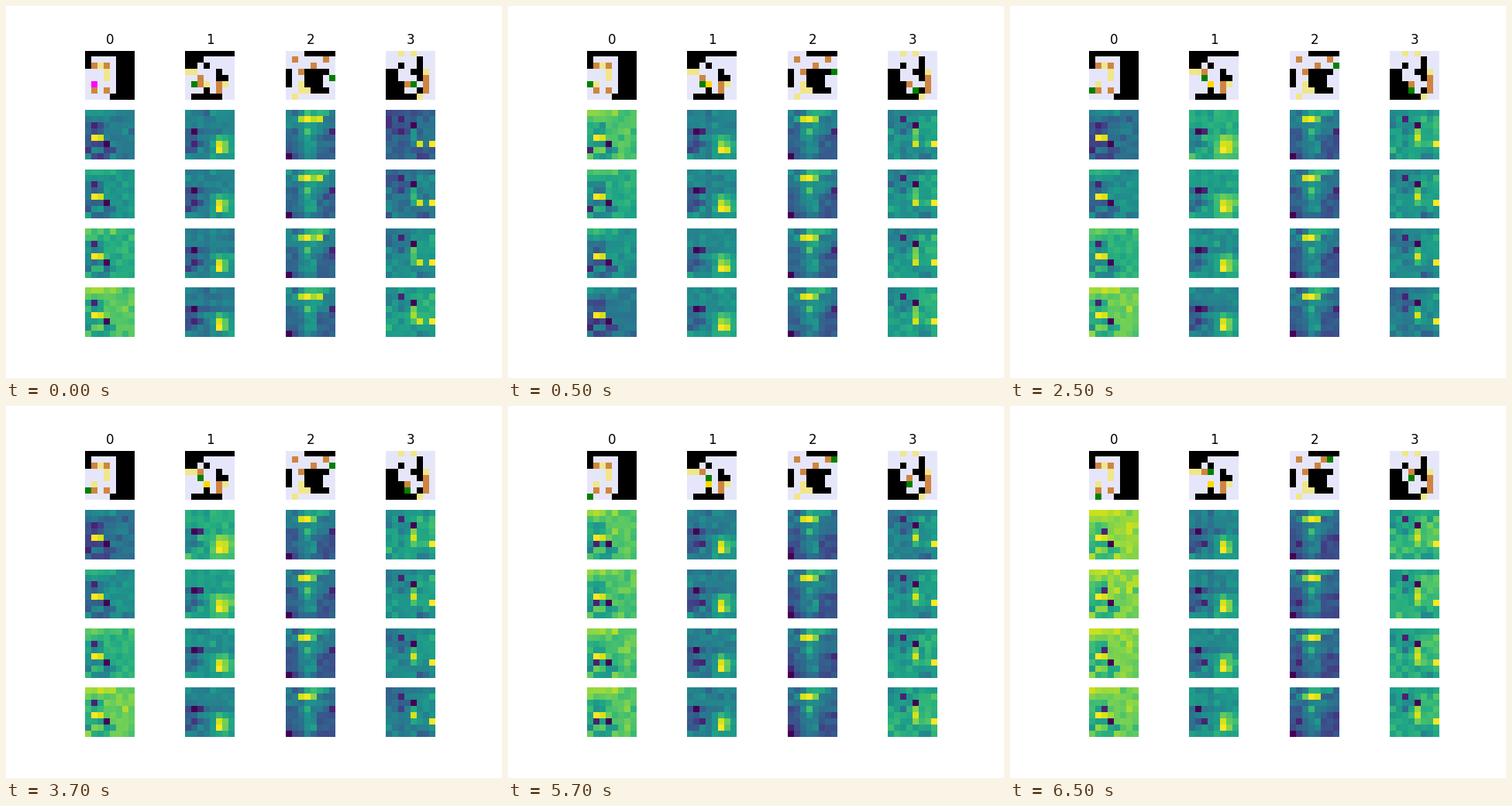
Animation, 640 px wide and 480 px high, one loop 8000 ms. Source, as a matplotlib script:

```python
import numpy as np
import matplotlib.pyplot as plt
from matplotlib.animation import FuncAnimation
from matplotlib.colors import to_rgb

N, STEPS, HEADS = 8, 5, 4
MOVES = {"U": -10, "D": 10, "L": -1, "R": 1}


def block(first, last):
    """Slices spanning two cells, each given as a row-column digit pair."""
    (r0, c0), (r1, c1) = divmod(first, 10), divmod(last, 10)
    return slice(r0, r1 + 1), slice(c0, c1 + 1)


def level_images(walls, goals, boxes, player, moves):
    """Play the box-pushing moves and paint the room after each one."""
    room = np.full((N, N, 3), to_rgb("lavender"))
    for span in walls:
        room[block(*span)] = to_rgb("black")
    images = []
    for move in " " + moves:
        shift = MOVES.get(move, 0)
        player += shift
        boxes = [b + shift if b == player else b for b in boxes]
        img = room.copy()
        for g in goals:
            img[divmod(g, 10)] = to_rgb("khaki")
        for b in boxes:
            img[divmod(b, 10)] = to_rgb("gold" if b in goals else "peru")
        img[divmod(player, 10)] = to_rgb("magenta" if player in goals else "green")
        images.append(img)
    return images


def heat_images(seed, ramps, low, dips, high, peaks, patches):
    """A shared relief, lifted from the top panel to the bottom one by a ramp."""
    rng = np.random.default_rng(seed)
    relief = rng.normal(0, 0.03, (N, N))
    for first, last, delta in patches:
        relief[block(first, last)] += delta
    images = []
    for (top, bottom), dip, peak in zip(ramps, dips, peaks):
        for level in np.linspace(top, bottom, HEADS):
            img = level + relief + rng.normal(0, 0.03, (N, N))
            img = np.clip(img, 0.1, 0.92)
            for code, value in ((dip, 0.1), (peak, 0.94), (low, 0), (high, 1)):
                img[divmod(code, 10)] = value
            images.append(img)
    return images


room0 = level_images([(0, 7), (10, 20), (15, 77), (74, 74)],
                     [22, 33, 43, 51], [21, 23, 61, 63], 51, "LDDR")
room1 = level_images([(0, 7), (10, 12), (20, 21), (23, 23), (35, 35), (45, 46),
                      (63, 63), (71, 75)],
                     [30, 31, 53, 56], [42, 52, 55, 65], 51, "RURU")
room2 = level_images([(3, 7), (30, 50), (33, 36), (43, 55), (64, 66)],
                     [52, 62, 63, 71], [11, 16, 24, 32], 47, "UUUL")
room3 = level_images([(15, 25), (22, 22), (30, 41), (34, 35), (45, 45),
                      (50, 62), (65, 65), (70, 74)],
                     [2, 4, 36, 75], [46, 53, 56, 66], 54, "DLUU")

heat0 = heat_images(
    1, [(.42, .74), (.72, .4), (.38, .78), (.72, .74), (.84, .78)],
    53, [21, 60, 21, 51, 32], 41, [42] * STEPS,
    [(0, 4, .1), (20, 22, -.12), (31, 32, -.15), (40, 50, -.13),
     (51, 52, -.2), (60, 60, -.28), (63, 64, -.2), (71, 73, -.15)])
heat1 = heat_images(
    2, [(.45, .42), (.45, .5), (.62, .45), (.42, .44), (.44, .52)],
    31, [51, 32, 32, 52, 52], 65, [55, 66, 55, 55, 55],
    [(30, 61, -.15), (32, 32, -.22), (51, 52, -.14), (44, 77, .1),
     (45, 46, .1), (55, 66, .22)])
heat2 = heat_images(
    3, np.linspace((.44, .44), (.36, .36), STEPS),
    70, [37, 37, 37, 60, 51], 13, [15, 12, 12, 12, 14],
    [(3, 6, .24), (12, 14, .42), (23, 64, .1), (33, 33, .2),
     (30, 61, -.12), (45, 77, -.13), (71, 72, -.1)])
heat3 = heat_images(
    4, [(.3, .56), (.5, .56), (.56, .43), (.46, .6), (.64, .6)],
    24, [12] * STEPS, 57, [55, 54, 44, 44, 44],
    [(0, 23, -.07), (32, 32, -.2), (15, 47, .08), (34, 54, .2),
     (55, 56, .1), (75, 76, -.14)])

rooms = [room0, room1, room2, room3]
heats = [heat0, heat1, heat2, heat3]

fig, axes = plt.subplots(1 + HEADS, len(rooms), figsize=(6.4, 4.8), dpi=100)
for ax in axes.flat:
    ax.axis("off")
for col, ax in enumerate(axes[0]):
    ax.set_title(str(col))

views = [[ax.imshow(np.zeros((N, N)), vmin=0, vmax=1, cmap="viridis",
                    interpolation="nearest") for ax in line] for line in axes]


def update(frame):
    step = (frame + 3) // 4
    for col, (room, heat) in enumerate(zip(rooms, heats)):
        views[0][col].set_data(room[step])
        for head in range(HEADS):
            views[1 + head][col].set_data(heat[HEADS * step + head])
    return [view for line in views for view in line]


anim = FuncAnimation(fig, update, frames=16, interval=500, repeat=True,
                     repeat_delay=0)
plt.show()
```
